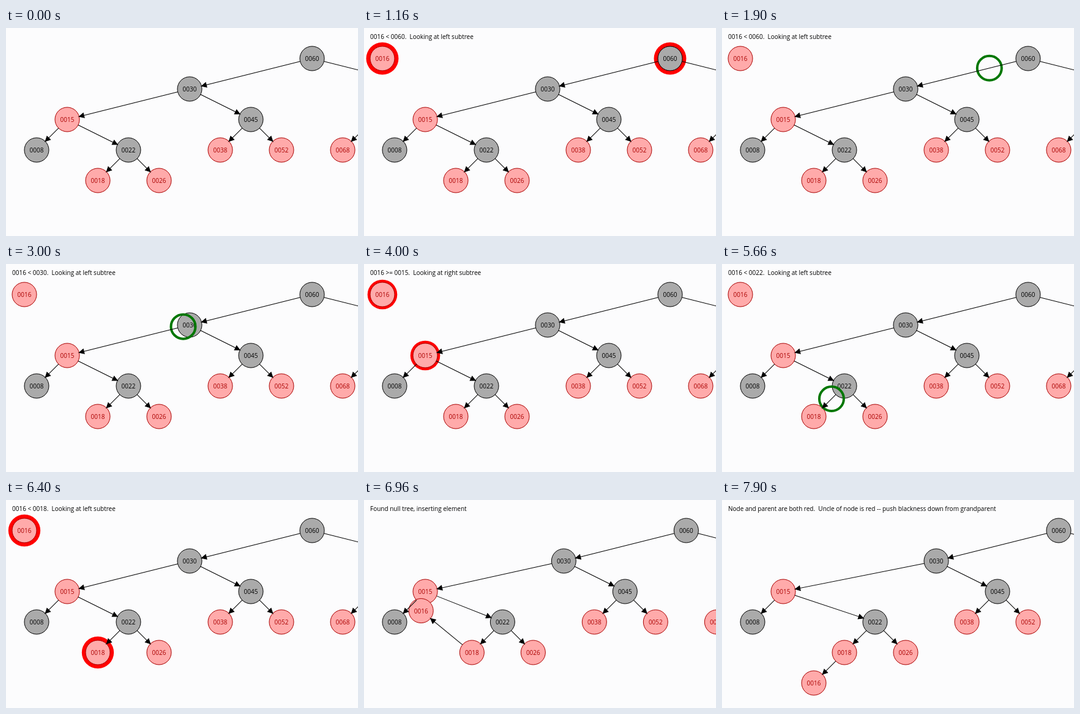
Animation of 575x341 px, one loop 8000 ms. Source, as an HTML page with a canvas:

```html
<!DOCTYPE html>
<html lang="en">
<head>
<meta charset="utf-8">
<title>Red-black tree insertion</title>
<style>
  html, body { margin: 0; width: 100%; height: 100%; overflow: hidden; background: #fcfcfd; }
  canvas { display: block; width: 575px; height: 341px; }
</style>
</head>
<body>
<canvas id="stage" width="575" height="341"></canvas>
<script>
const ctx = document.getElementById('stage').getContext('2d');
const LOOP = 8000, TICK = 30.8, STEPS = 19, R = 20, GAP = 50;

// Keys in order of insertion; the new one is added last
const KEYS = [60, 30, 90, 15, 45, 75, 8, 22, 38, 52, 68, 82, 18, 26];
const RED = new Set([15, 16, 18, 26, 38, 52, 68, 82]);
const NEW = 16, ALL = [...KEYS, NEW];

// Keys compared on the way down to the given key
function path(key) {
  let lo = -Infinity, hi = Infinity;
  return ALL.slice(0, ALL.indexOf(key)).filter(k => {
    if (k < lo || k > hi) return false;
    if (key < k) hi = k; else lo = k;
    return true;
  });
}

// Columns follow the sorted order, rows the depth
function place(key, keys) {
  const rank = keys.filter(k => k <= key).length;
  return { x: GAP * rank, y: GAP * (1 + path(key).length) };
}

const ROUTE = path(NEW);
const BEGIN = 500, COMPARE = 1115, BLOCK = 600, CYCLE = 1235;
const ATTACH = COMPARE + CYCLE * (ROUTE.length - 1) + BLOCK;
const REPAIR = ATTACH + 2 * BLOCK;

const label = key => String(key).padStart(4, '0');

const mix = (a, b, k) => ({ x: a.x + (b.x - a.x) * k, y: a.y + (b.y - a.y) * k });

// Movement advances in whole ticks
function progress(t, start) {
  const k = Math.floor((t - start) / TICK);
  return Math.max(0, Math.min(1, k / STEPS));
}

// Triangle wave for the width of the highlight
function pulse(t) {
  const period = 56 * TICK;
  const phase = (t + 2 * period - 4540) % period / period;
  return 2.8 + 8 * Math.abs(phase - 0.5);
}

function disc(x, y, r, fill) {
  ctx.beginPath();
  ctx.arc(x, y, r, 0, 2 * Math.PI);
  ctx.fillStyle = fill;
  ctx.fill();
}

function drawNode({ key, x, y }, glow) {
  const red = RED.has(key);
  if (glow) disc(x, y, R + glow, '#f00');
  disc(x, y, R, red ? '#faa' : '#aaa');
  ctx.lineWidth = 1;
  ctx.strokeStyle = red ? '#a00' : '#000';
  ctx.stroke();
  ctx.fillStyle = ctx.strokeStyle;
  ctx.textAlign = 'center';
  ctx.fillText(label(key), x, y + 4);
}

function drawEdge(a, b) {
  const len = Math.hypot(b.x - a.x, b.y - a.y);
  ctx.save();
  ctx.translate(a.x, a.y);
  ctx.rotate(Math.atan2(b.y - a.y, b.x - a.x));
  ctx.strokeStyle = ctx.fillStyle = '#000';
  ctx.lineWidth = 1;
  ctx.beginPath();
  ctx.moveTo(R, 0);
  ctx.lineTo(len - R, 0);
  ctx.lineTo(len - R - 8, -4);
  ctx.lineTo(len - R - 8, 4);
  ctx.lineTo(len - R, 0);
  ctx.stroke();
  ctx.fill();
  ctx.restore();
}

function drawRing({ x, y }) {
  ctx.beginPath();
  ctx.arc(x, y, R, 0, 2 * Math.PI);
  ctx.lineWidth = 4;
  ctx.strokeStyle = '#070';
  ctx.stroke();
}

function message(t, key) {
  if (t < BEGIN) return '';
  if (t < COMPARE) return `Inserting ${label(NEW)}`;
  if (t >= REPAIR) return 'Node and parent are both red.  Uncle of node is red -- push blackness down from grandparent';
  if (t >= ATTACH) return 'Found null tree, inserting element';
  const [sign, side] = NEW < key ? ['<', 'left'] : ['>=', 'right'];
  return `${label(NEW)} ${sign} ${label(key)}.  Looking at ${side} subtree`;
}

function draw(t) {
  ctx.fillStyle = '#fcfcfd';
  ctx.fillRect(0, 0, 575, 341);
  ctx.font = '10px "Open Sans", "Noto Sans", sans-serif';

  const shift = progress(t, ATTACH);
  const nodes = new Map();
  for (const key of t < BEGIN ? KEYS : ALL) {
    const from = key === NEW ? { x: 30, y: 50 } : place(key, KEYS);
    nodes.set(key, { key, ...mix(from, place(key, ALL), shift) });
  }

  const step = Math.min(Math.floor((t - COMPARE) / CYCLE), ROUTE.length - 1);
  const since = t - COMPARE - step * CYCLE;
  const key = ROUTE[step], next = ROUTE[step + 1];
  const comparing = step >= 0 && since < BLOCK;
  const lit = n => comparing && (n.key === NEW || n.key === key);
  const all = [...nodes.values()];

  all.filter(n => !lit(n)).forEach(n => drawNode(n, 0));
  all.filter(lit).forEach(n => drawNode(n, pulse(t)));
  if (key && next && !comparing) {
    drawRing(mix(nodes.get(key), nodes.get(next), progress(since, BLOCK)));
  }
  for (const n of all) {
    const parent = path(n.key).pop();
    if (parent && (n.key !== NEW || t >= ATTACH)) drawEdge(nodes.get(parent), n);
  }

  ctx.fillStyle = '#000';
  ctx.textAlign = 'left';
  ctx.fillText(message(t, key), 10, 18);
}

// The picture is refreshed thirty times a second
function loop() {
  const t = performance.now() % LOOP;
  draw(Math.floor((t + 7) * 0.03) / 0.03);
  requestAnimationFrame(loop);
}
loop();
</script>
</body>
</html>
```
